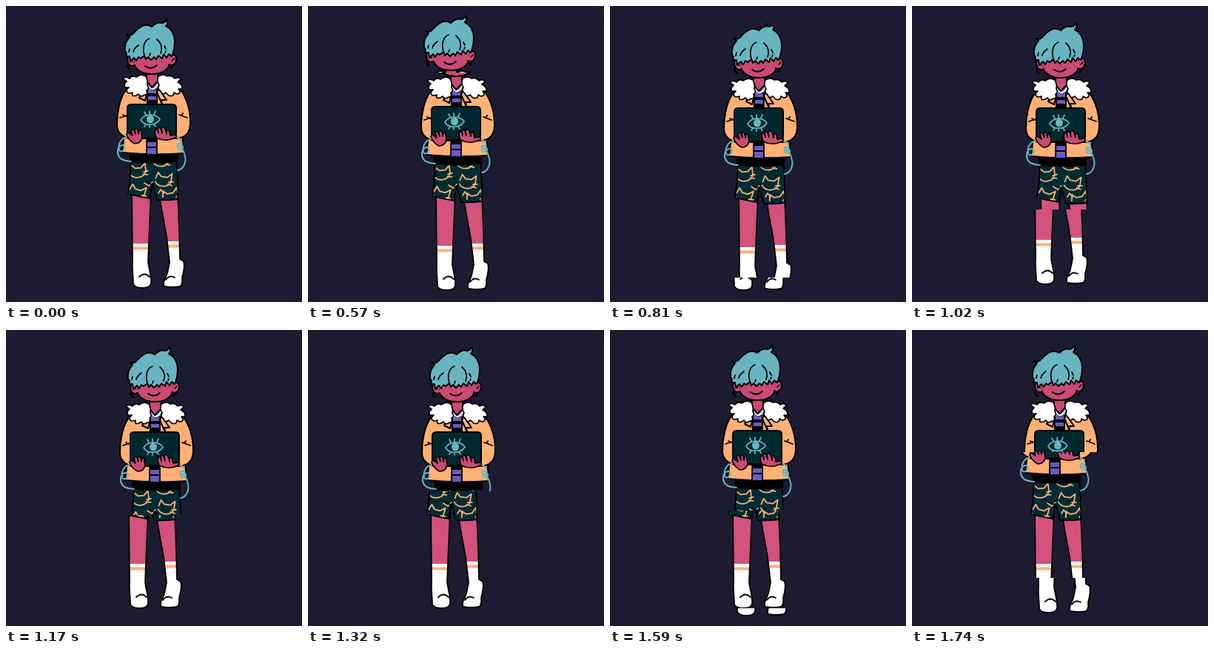
Recreate the animation shown at these times as an HTML page with a canvas. Size 400 px wide and 400 px high, loop 1.77 s.

```html
<!DOCTYPE html>
<html lang="en">
<head>
<meta charset="utf-8">
<title>Glitching laptop kid</title>
<style>
html, body { margin: 0; width: 100%; height: 100%; overflow: hidden; background: #1c1b32; }
canvas { display: block; width: 400px; height: 400px; }
</style>
</head>
<body>
<canvas id="stage" width="400" height="400"></canvas>
<script>
const SIZE = 400, LOOP = 1770, STEP = 30, START = 570;
const BG = '#1c1b32', INK = '#000', TEAL = '#68b5c1', FACE = '#c94a73', LEG = '#d2527c',
  ORANGE = '#ffb074', DARK = '#02282f', PURPLE = '#675bc4', WHITE = '#fff';

const stage = document.getElementById('stage').getContext('2d');
const art = document.createElement('canvas');
art.width = art.height = SIZE;
const g = art.getContext('2d');
g.lineJoin = g.lineCap = 'round';

function shape(d, fill, line = INK, width = 2) {
  const p = new Path2D(d);
  if (fill) { g.fillStyle = fill; g.fill(p); }
  if (line) { g.strokeStyle = line; g.lineWidth = width; g.stroke(p); }
}
const stroke = (d, color = INK, width = 1.8) => shape(d, null, color, width);

function clipped(d, paint) {
  g.save();
  g.clip(new Path2D(d));
  paint();
  g.restore();
}

function cat(x, y, turn) {
  g.save();
  g.translate(x, y);
  g.rotate(turn);
  stroke('M-11 -2L-9 -10L-4 -5Q0 -5 4 -5L10 -11L10 -1C10 8 -5 11 -11 3M7 1L13 0M6 4L12 5', ORANGE, 1.8);
  g.restore();
}

function legs() {
  const left = 'M170 248L171 346C170 355 172 366 172 376Q175 381 184 381Q195 381 196 375C197 367 194 359 192 346L196 248Z';
  const right = 'M207 252C210 280 216 300 218 320L221 346C219 355 219 363 214 370Q212 377 214 379Q225 381 235 379Q239 377 238 367C240 360 242 351 240 345L235 342L234 300L232 252Z';
  for (const [d, x, y] of [[left, 165, 321], [right, 205, 318]]) {
    shape(d, LEG, null);
    clipped(d, () => {
      g.fillStyle = WHITE;
      g.fillRect(x, y, 40, 70);
      g.fillStyle = ORANGE;
      g.fillRect(x, y + 4.5, 40, 4);
    });
    stroke(d);
  }
  stroke('M180 366Q187 359 194 366M216 370Q221 363 228 367');
}

function shorts() {
  const d = 'M169 204C169 225 167 240 165 254Q180 258 194 260L198 240L204 262Q218 263 232 261C233 240 231 222 230 204Z';
  shape(d, '#022c34', null);
  clipped(d, () => {
    cat(179, 224, -0.1);
    cat(210, 209, 0.1);
    cat(213, 236, 0.15);
    cat(177, 253, 0.3);
    cat(223, 258, -0.2);
    stroke('M187 239L193 243L198 238M206 253L209 248L213 253', ORANGE, 1.7);
  });
  stroke(d);
  stroke('M189 238L199 242');
}

function torso() {
  shape('M167 198H231V210Q200 213 168 210Z', INK);
  shape('M160 172L157 198Q199 202 240 199L238 172Z', ORANGE);
  shape('M163 112C154 123 150 143 150 160C150 171 156 176 166 179L230 179C243 178 249 170 249 158C249 141 245 126 236 113Q215 105 197 106Q178 105 163 112Z', ORANGE);
  const shirt = 'M191 105L190 200L204 200L204 105Z';
  shape(shirt, PURPLE, null);
  clipped(shirt, () => {
    g.fillStyle = INK;
    for (const [y, h] of [[118, 4], [127, 6], [178, 6], [190, 2]]) g.fillRect(185, y, 25, h);
  });
  stroke('M191 112L190 200M204 112L204 200');
  shape('M187 111L180 124L188 128L191 115Z', ORANGE);
  shape('M206 111L217 127L210 127L211 133L204 117Z', ORANGE);
  stroke('M154 151L163 148M245 151L234 147M158 147L162 149M239 145L237 148');
  stroke('M172 179C158 173 151 184 153 195C157 200 165 190 158 188C150 188 148 201 156 207Q162 210 169 210', TEAL, 2);
  stroke('M222 178C235 175 239 182 237 190C230 191 230 184 235 186C244 191 236 198 232 192C230 187 239 190 241 200C245 210 240 221 232 222', TEAL, 2);
}

function fur() {
  shape('M190 86L190 101L197 110L205 102L205 86Z', FACE);
  stroke('M188 101Q192 112 198 113Q206 110 207 101', WHITE, 3);
  stroke('M189 105Q194 114 199 114Q206 111 207 104', INK, 1);
  shape('M189 95Q182 91 176 96Q170 93 167 98Q162 95 158 98L163 102Q158 106 161 110L166 110Q160 115 166 118L171 117Q169 123 176 121L179 119Q182 124 187 120Q192 121 190 114Q194 112 191 107Q192 100 189 95Z', WHITE, INK, 1.7);
  shape('M206 95Q213 91 218 95Q224 93 228 98Q234 95 236 99L232 103Q239 106 238 112L233 112Q238 118 231 119L227 117Q227 123 220 121L216 117Q211 121 209 115Q204 112 207 107Q203 101 206 95Z', WHITE, INK, 1.7);
}

function laptop() {
  shape('M169 133H225Q230 133 230 138V171Q230 178 224 178H170Q164 178 164 172V138Q164 133 169 133Z', DARK);
  stroke('M182 154C187 145 202 145 208 153C203 162 187 163 182 154ZM189 147L187 143M194 146L194 142M200 147L202 142M189 160L187 163M194 161L194 164M200 160L202 163', TEAL, 1.7);
  g.fillStyle = TEAL;
  g.beginPath();
  g.ellipse(195, 153, 5, 5.5, 0, 0, Math.PI * 2);
  g.fill();
  shape('M163 174Q163 170 167 172L171 175L169 168Q171 165 173 168L175 173L174 167Q177 164 178 168L179 173L180 168Q183 166 183 171L184 178Q182 186 174 186Q167 183 163 174Z', FACE, INK, 1.6);
  shape('M203 178Q200 171 202 167Q205 165 206 172L205 166Q207 163 209 166L211 172L210 165Q213 162 215 166L217 173L217 168Q220 166 221 170L222 175L229 174Q233 177 226 179Q215 184 203 178Z', FACE, INK, 1.6);
}

function head() {
  shape('M172 60L173 79C177 88 185 92 197 92C211 92 219 86 222 77L223 60Z', FACE);
  shape('M173 69C164 64 163 71 165 77Q168 83 174 80', FACE);
  shape('M222 67C230 63 231 71 229 76Q226 82 220 79', FACE);
  stroke('M188 81Q196 87 204 80');
  stroke('M164 81L167 86M225 80L223 84', INK, 2.4);
  stroke('M168 73L171 75M227 71L224 74', INK, 1.5);
  shape('M163 39Q168 41 171 38Q177 31 184 27Q191 24 197 28Q204 21 211 23Q216 22 217 18Q220 23 216 27Q227 32 228 47Q228 59 224 68L220 65L217 70L213 65L211 71L206 67L203 72L200 69L196 73L192 69L189 72L187 67L182 71L179 69L176 74L173 70L168 75L167 68L162 68Q164 64 161 61Q160 52 164 46L167 42Z', TEAL);
  stroke('M188 69C183 57 187 46 194 44M204 45Q213 53 209 64M179 53Q173 57 172 62M214 54L216 58M215 63L216 61M167 58L166 62M194 67L195 64', INK, 1.7);
}

[legs, shorts, torso, fur, laptop, head].forEach(draw => draw());

// time, three band edges, then dx, dy for each of the four bands
const keys = [
  [570, 90, 400, 400, -4, -5, 3, 3, 3, 3, 3, 3],
  [810, 28, 367, 400, -5, 6, 4, 5, -4, 3, -4, 3],
  [1020, 0, 275, 400, -4, 5, 4, 5, -4, -5, -4, -5],
  [1080, 0, 263, 400, 0, 5, 4, 5, -4, -5, -4, -5],
  [1110, 0, 263, 400, 0, 5, 4, 5, -4, -5, -4, -5],
  [1320, 0, 218, 400, 0, 0, 4, 5, -4, -5, -4, -5],
  [1500, 0, 292, 400, 0, 0, 0, 0, -4, -5, -1, 5],
  [1620, 0, 228, 368, 0, 0, 3, 4, -4, -5, 0, 5],
  [1650, 0, 228, 368, 0, 0, 3, 4, -4, -5, 0, 5],
  [1740, 0, 165, 335, 0, 0, 2, 3, -4, -5, 0, 1]
];

function pose(t) {
  let i = 0;
  while (i < keys.length - 2 && t >= keys[i + 1][0]) i++;
  const a = keys[i], b = keys[i + 1];
  const k = (t - a[0]) / (b[0] - a[0]);
  return a.map((v, n) => Math.round(v + (b[n] - v) * k));
}

function band(top, bottom, dx, dy) {
  if (bottom <= top) return;
  stage.save();
  stage.beginPath();
  stage.rect(0, top, SIZE, bottom - top);
  stage.clip();
  stage.drawImage(art, dx, dy);
  stage.restore();
}

function render(now) {
  const t = Math.floor((now % LOOP) / STEP) * STEP;
  stage.fillStyle = BG;
  stage.fillRect(0, 0, SIZE, SIZE);
  if (t < START) {
    stage.drawImage(art, 0, 0);
    return;
  }
  const p = pose(t);
  const edges = [0, p[1], p[2], p[3], SIZE];
  for (let i = 0; i < 4; i++) band(edges[i], edges[i + 1], p[4 + i * 2], p[5 + i * 2]);
}

const begin = performance.now();
function tick() {
  render(performance.now() - begin);
  requestAnimationFrame(tick);
}
tick();
</script>
</body>
</html>
```
